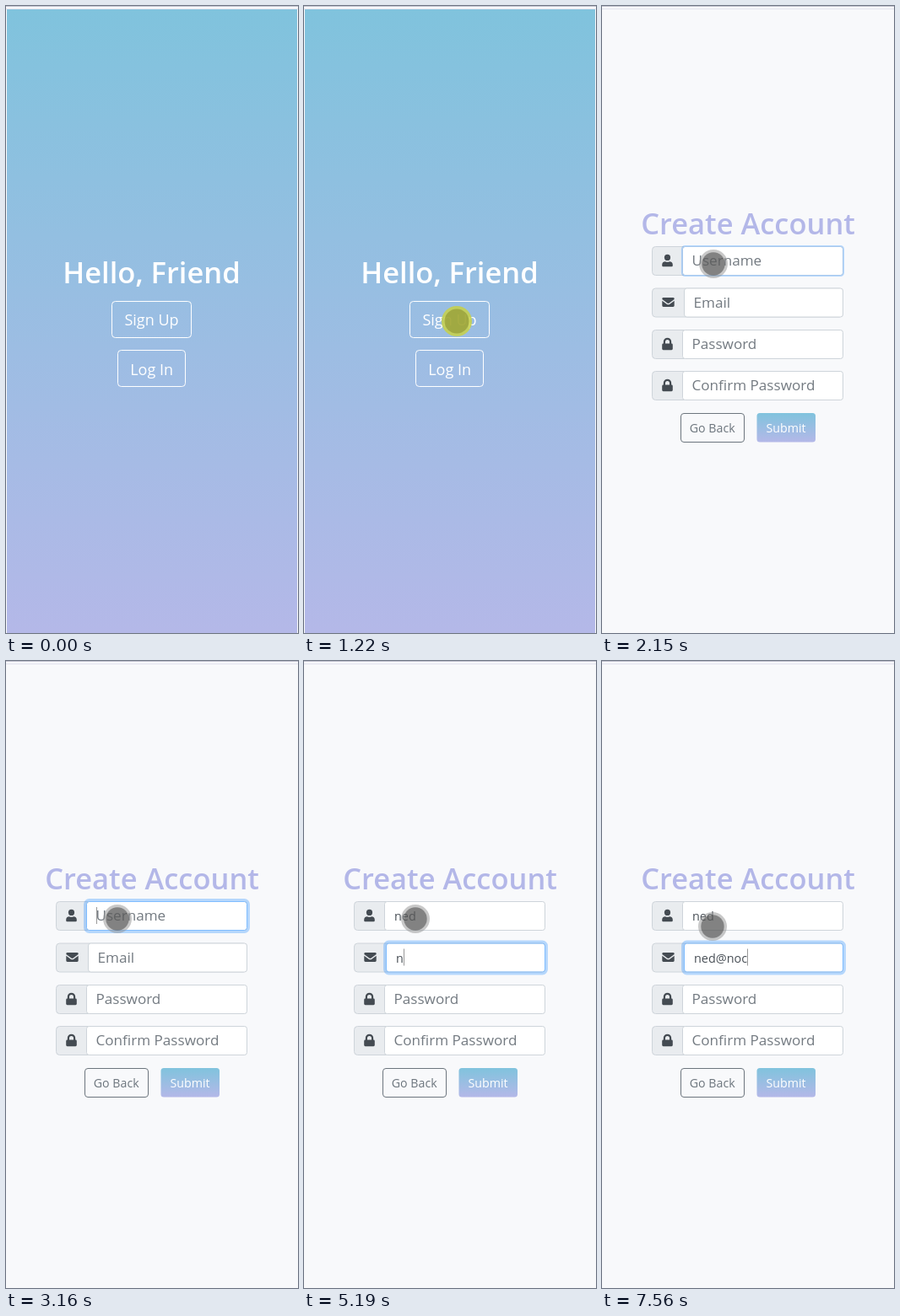
An HTML page for the animation above (8 s loop, 346 by 744 pixels).

```html
<!DOCTYPE html>
<html lang="en">
<head>
<meta charset="utf-8">
<title>Sign-up form</title>
<style>
  html, body { margin: 0; width: 100%; height: 100%; overflow: hidden; background: #f8f9fb; }
  svg { display: block; font-family: "Open Sans", "Noto Sans", sans-serif; }
  .mid { text-anchor: middle; }
  .title { font-size: 34.5px; font-weight: 600; }
  .big { font-size: 18px; }
  .small { font-size: 14.2px; }
  .hint { font-size: 17.1px; fill: #737a81; }
  .value { font-size: 14.4px; fill: #495057; }
  .mail { font-size: 17.7px; font-weight: 600; fill: #202124; }
  .icon { fill: #444b52; }
</style>
</head>
<body>
<svg width="346" height="744" viewBox="0 0 346 744">
  <defs>
    <linearGradient id="sky" x2="0" y2="1">
      <stop stop-color="#80c3dd"/><stop offset="1" stop-color="#b4b8e8"/>
    </linearGradient>
    <filter id="shadow" x="-10%" y="-10%" width="120%" height="120%">
      <feDropShadow dx="0" dy="1" stdDeviation="2.5" flood-opacity=".4"/>
    </filter>
  </defs>
  <rect width="346" height="744" fill="#f8f9fb"/>
  <path d="M0 .5H346" stroke="#c6c6d2"/>
  <path d="M0 3.5H346" stroke="#e2e2ee"/>

  <g id="welcome" fill="#fff">
    <rect x="1" y="4" width="344" height="740" fill="url(#sky)"/>
    <text class="mid title" x="172.5" y="329">Hello, Friend</text>
    <g fill="none" stroke="#fff">
      <rect x="125.5" y="350.5" width="94" height="43" rx="4"/>
      <rect x="132.5" y="408.5" width="80" height="43" rx="4"/>
    </g>
    <text class="mid big" x="172.5" y="379">Sign Up</text>
    <text class="mid big" x="172.7" y="438">Log In</text>
  </g>

  <g id="signup">
    <text class="mid title" x="173" y="271" fill="#b3b7e8">Create Account</text>
    <g id="fields"></g>
    <rect x="93.5" y="483.5" width="75" height="34" rx="3.5" fill="none" stroke="#6c757d"/>
    <text class="mid small" x="130.7" y="505.5" fill="#6c757d">Go Back</text>
    <rect x="183.5" y="483" width="69.5" height="34.5" rx="3.5" fill="url(#sky)"/>
    <text class="mid small" x="218" y="505.5" fill="#fff">Submit</text>
  </g>

  <g id="popup">
    <rect x="158" y="349" width="300" height="195" rx="5" fill="#fff" filter="url(#shadow)"/>
    <path d="M158 483H346V544H163a5 5 0 0 1-5-5z" fill="#f8f9fa"/>
    <text class="mail" x="176" y="395">velmorina_thorn@lu</text>
    <text class="mail" x="176" y="449">tbeafield3@plomo.c</text>
    <text x="175.5" y="521" font-size="18.6" fill="#5f6368">Manage...</text>
  </g>

  <g id="pointer"><circle id="ring"/><circle id="core"/></g>
</svg>
<script>
const LOOP = 8000, SIGNUP_AT = 1390, TAB_AT = 4510;
const $ = id => document.getElementById(id);
const show = (el, on) => el.setAttribute('display', on ? 'inline' : 'none');
const clamp = v => Math.max(0, Math.min(1, v));
const easeInOut = v => v * v * (3 - 2 * v);
const easeOut = v => 1 - (1 - v) ** 2;

// Icons are centred on 0,0
const icons = {
  user: `<circle cy="-3.6" r="3.6"/>
    <path d="M-6.3 5.9V5a3.8 3.8 0 0 1 3.8-3.8q2.5 1.2 5 0A3.8 3.8 0 0 1 6.3 5v.9q0 1.3-1.3 1.3H-5q-1.3 0-1.3-1.3z"/>`,
  mail: `<path d="M-7.2-4q0-1.4 1.4-1.4H5.8q1.4 0 1.4 1.4v.5L1.2 1.1q-1.2.9-2.4 0L-7.2-3.5z"/>
    <path d="M-7.2-1.8L-1.8 2.2q1.8 1.2 3.6 0L7.2-1.8V4q0 1.4-1.4 1.4H-5.8q-1.4 0-1.4-1.4z"/>`,
  lock: `<rect x="-6.3" y="-.5" width="12.6" height="7.7" rx="1.4"/>
    <path d="M-3.6 0V-2.6a3.6 3.6 0 0 1 7.2 0V0" fill="none" stroke="#444b52" stroke-width="2.2"/>`
};

function addField(y, hint, icon, split = 95.5) {
  const box = `x="${split}" y="${y}" width="${285.5 - split}" height="34" rx="3"`;
  const g = document.createElementNS('http://www.w3.org/2000/svg', 'g');
  g.innerHTML = `
    <rect x="59.5" y="${y}" width="226" height="34" rx="4" fill="#e9ecef" stroke="#ced4da"/>
    <rect class="glow" ${box} fill="none" stroke="#007bff" stroke-opacity=".27" stroke-width="0"/>
    <rect ${box} fill="#fff" stroke="#ced4da"/>
    <rect class="edge" ${box} fill="none" stroke="#80bdff" opacity="0"/>
    <g class="icon" transform="translate(${split / 2 + 29.75} ${y + 16.5})">${icons[icon]}</g>
    <text class="hint" x="${split + 11}" y="${y + 22.5}">${hint}</text>
    <text class="value" x="${split + 11.5}" y="${y + 22.5}"></text>
    <path class="caret" d="M${split + 12} ${y + 6.5}v20" stroke="#999" display="none"/>`;
  $('fields').append(g);
  const part = name => g.querySelector('.' + name);
  return { glow: part('glow'), edge: part('edge'), hint: part('hint'), value: part('value'), caret: part('caret') };
}

const user = addField(285.5, 'Username', 'user');
const mail = addField(335, 'Email', 'mail', 97.5);
addField(384.5, 'Password', 'lock');
addField(433.5, 'Confirm Password', 'lock');

// Focus fade, typed characters and a caret that restarts its blink on every key
function drawField(f, t, text, blinkFrom, keys, from, to) {
  const fade = start => t < start ? 0 : easeOut(clamp((t - start + 50) / 190));
  const focus = fade(from) * (1 - fade(to));
  f.glow.setAttribute('stroke-width', 6.8 * focus);
  f.edge.setAttribute('opacity', focus);
  const typed = keys.filter(k => t >= k);
  f.value.textContent = text.slice(0, typed.length);
  show(f.hint, !typed.length);
  const last = typed.length ? typed.at(-1) : blinkFrom;
  show(f.caret, t >= from && t < to && t >= last && Math.floor((t - last) / 500) % 2 === 0);
  f.caret.setAttribute('transform', `translate(${typed.length ? Math.round(f.value.getComputedTextLength()) : 0} 0)`);
}

// Stepped glide between two points, one hop every 75 ms
function glide(t, start, hops, [x0, y0], [x1, y1]) {
  const k = easeInOut(clamp((Math.floor((t - start) / 75) + 1) / hops));
  return [x0 + (x1 - x0) * k, y0 + (y1 - y0) * k];
}

function pointerAt(t) {
  if (t < 310 || (t >= 6290 && t < 7160)) return null;
  if (t < 390) return [203, 507];
  if (t < 1390) return glide(t, 620, 9, [197, 481], [181, 374]);
  if (t < 2150) return glide(t, 1680, 5, [182, 375], [130.5, 304.5]);
  return t < 6290 ? [132, 306] : [131, 315];
}

function drawPointer(t) {
  const at = pointerAt(t), onSky = t < SIGNUP_AT;
  show($('pointer'), at);
  if (!at) return;
  $('pointer').setAttribute('transform', `translate(${at})`);
  const paint = (id, r, fill) => { $(id).setAttribute('r', r); $(id).setAttribute('fill', fill); };
  paint('ring', onSky ? 18 : 17, onSky ? 'rgba(200,210,70,.85)' : 'rgba(145,145,145,.5)');
  paint('core', onSky ? 14.5 : 13.7, onSky ? 'rgba(128,132,40,.5)' : 'rgba(65,65,65,.52)');
}

function draw(t) {
  show($('welcome'), t < SIGNUP_AT);
  show($('signup'), t >= SIGNUP_AT);
  show($('popup'), t >= TAB_AT && t < 5190);
  drawField(user, t, 'ned', 2160, [3720, 3890, 4120], 2150, TAB_AT);
  drawField(mail, t, 'ned@noc', 4460, [5190, 5500, 5980, 6770, 7160, 7330, 7560], TAB_AT, Infinity);
  drawPointer(t);
}

const begin = performance.now();
function tick() {
  draw((performance.now() - begin) % LOOP);
  requestAnimationFrame(tick);
}
tick();
</script>
</body>
</html>
```
